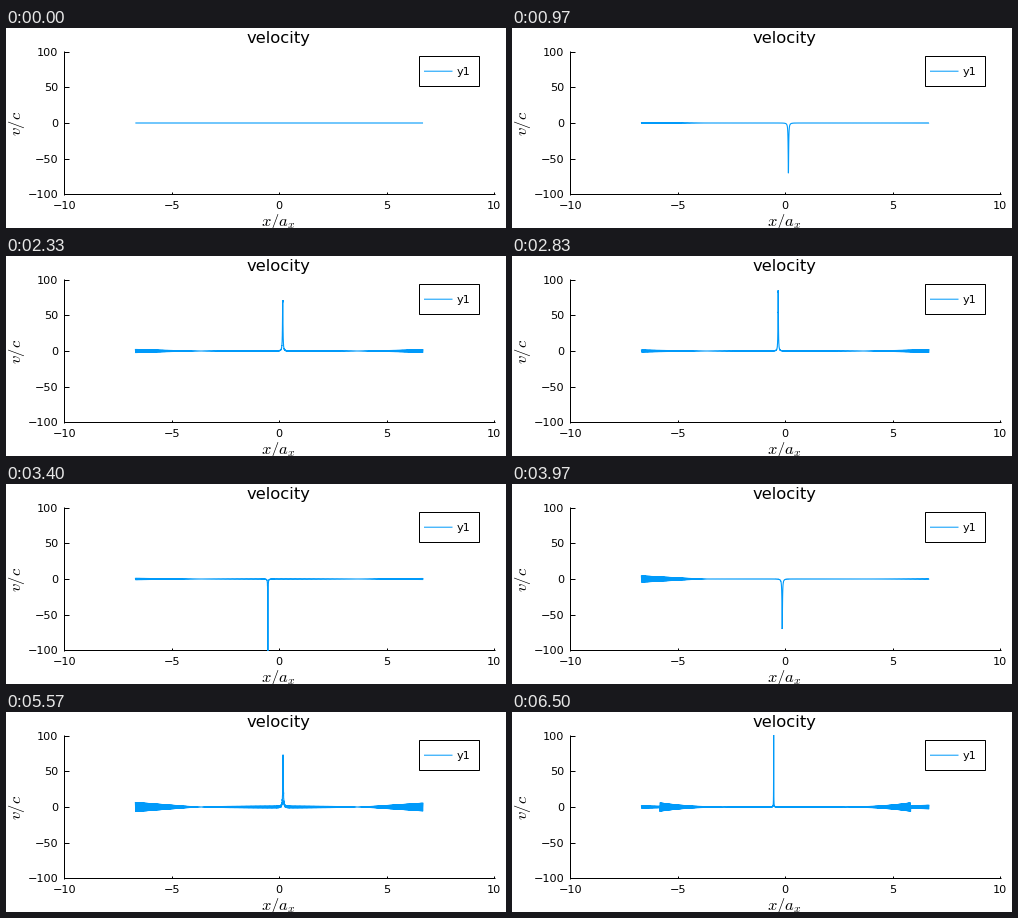
Animation, 500 px wide and 200 px high, one loop 6.53 s. Source, as a matplotlib script:

```python
import matplotlib.pyplot as plt
import numpy as np
from matplotlib.animation import FuncAnimation
from matplotlib.patches import Rectangle

W, H, DPI = 500, 200, 100
LOOP, FRAMES = 6530, 196
PERIOD = 3280             # ms per soliton oscillation
BURST = 5570              # ms at which the edge ripples peak
SWING, EDGE, NODE = 0.54, 6.69, 3.6  # soliton amplitude, cloud radius, ripple node
SOUND, WIDTH, SPEED = 4.71, 0.21, 0.0698
BLUE = "#009AFA"

plt.rcParams.update({
    "font.family": "DejaVu Sans",
    "mathtext.fontset": "cm",
    "path.simplify": False,
})


def pt(px):
    return px * 72 / DPI


def px_x(x):
    return 273.2 + 21.5 * x


def px_y(v):
    return 95 - 0.715 * v


fig = plt.figure(figsize=(W / DPI, H / DPI), dpi=DPI, facecolor="white")
ax = fig.add_axes([0, 0, 1, 1])
ax.set(xlim=(0, W), ylim=(H, 0))
ax.axis("off")


def rule(xs, ys, color="black", width=1, **kw):
    return ax.plot(xs, ys, color=color, lw=pt(width), solid_capstyle="butt", **kw)[0]


def label(x, y, text, size=11.3, ha="center", va="baseline", **kw):
    ax.text(x, y, text, fontsize=pt(size), ha=ha, va=va, **kw)


# Axes, ticks and labels
LEFT, BOTTOM = 58, 166
rule([LEFT, LEFT], [23, 167])
rule([LEFT, 489], [BOTTOM, BOTTOM])
for v in range(-100, 101, 50):
    y = min(px_y(v), BOTTOM)
    rule([LEFT, 63], [y, y])
    label(52.3, y + 4.2, str(v).replace("-", "\u2212"), ha="right")
for x in range(-10, 11, 5):
    rule([px_x(x)] * 2, [BOTTOM, 164])
    label(px_x(x), 181, str(x).replace("-", "\u2212"))
label(273, 15.2, "velocity", 16.4)
label(272.7, 198, "$x/a_x$", 16.5)
label(11, 95, "$v/c$", 16.5, va="center", rotation=90)

# Legend
ax.add_patch(Rectangle((413, 28), 60, 30, fc="white", ec="black", lw=pt(1)))
rule([418, 446.5], [43.2, 43.2], BLUE, snap=False)
label(451, 47.3, "y1", ha="left")


def ripple(x, t):
    """Height of the fine ripples: beating at both edges, a lobe in the middle."""
    r, age = np.abs(x), t / BURST
    beat = np.pi * (t - BURST) / 1600
    left = 7 * age * (0.22 + 0.78 * np.cos(beat) ** 2)
    right = 6 * age * (0.1 + 0.9 * np.cos(beat / 2) ** 2)
    edge = np.where(x < 0, left, right) * np.clip((r - NODE) / (EDGE - NODE), 0, 1)
    lobe = 0.3 * min(left, right) * np.sqrt(np.clip(1 - (r / NODE) ** 2, 0, 1))
    height = edge + lobe
    if t > BURST:  # the burst leaves the edge and moves inwards
        front = EDGE - 0.85 * (t - BURST) / 930
        height = np.where(r < front, np.maximum(height, 6.5 * (r / front) ** 4), height)
    return height


def flow(x, phase):
    """Backflow of a dark soliton; its peak softens near the turning points."""
    s = SPEED * np.sin(phase)
    soft = 0.0235 * np.cos(phase) ** 40
    tanh2 = np.tanh(x / WIDTH) ** 2
    return -SOUND * s * (1 - tanh2) / (s * s + soft * soft + tanh2 + 1e-12)


GRID = np.linspace(-EDGE, EDGE, 700)
NEAR = np.geomspace(0.001, 0.3, 30)
NEAR = np.concatenate([-NEAR[::-1], [0], NEAR])
SIGN = (-1.0) ** np.arange(GRID.size + NEAR.size)

curve = rule([], [], BLUE, 1.1, snap=False)
curve.set_solid_joinstyle("bevel")
curve.set_clip_path(Rectangle((58, 23), 431, 144, transform=ax.transData))


def draw(i):
    t = i * LOOP / FRAMES
    phase = 2 * np.pi * t / PERIOD
    centre = -SWING * np.cos(phase)
    x = np.sort(np.concatenate([GRID, centre + NEAR]))
    v = flow(x - centre, phase) + SIGN * ripple(x, t)
    curve.set_data(px_x(x), px_y(v))
    return (curve,)


anim = FuncAnimation(fig, draw, frames=FRAMES, interval=LOOP / FRAMES,
                     repeat=True, repeat_delay=0, blit=False)
plt.show()
```
